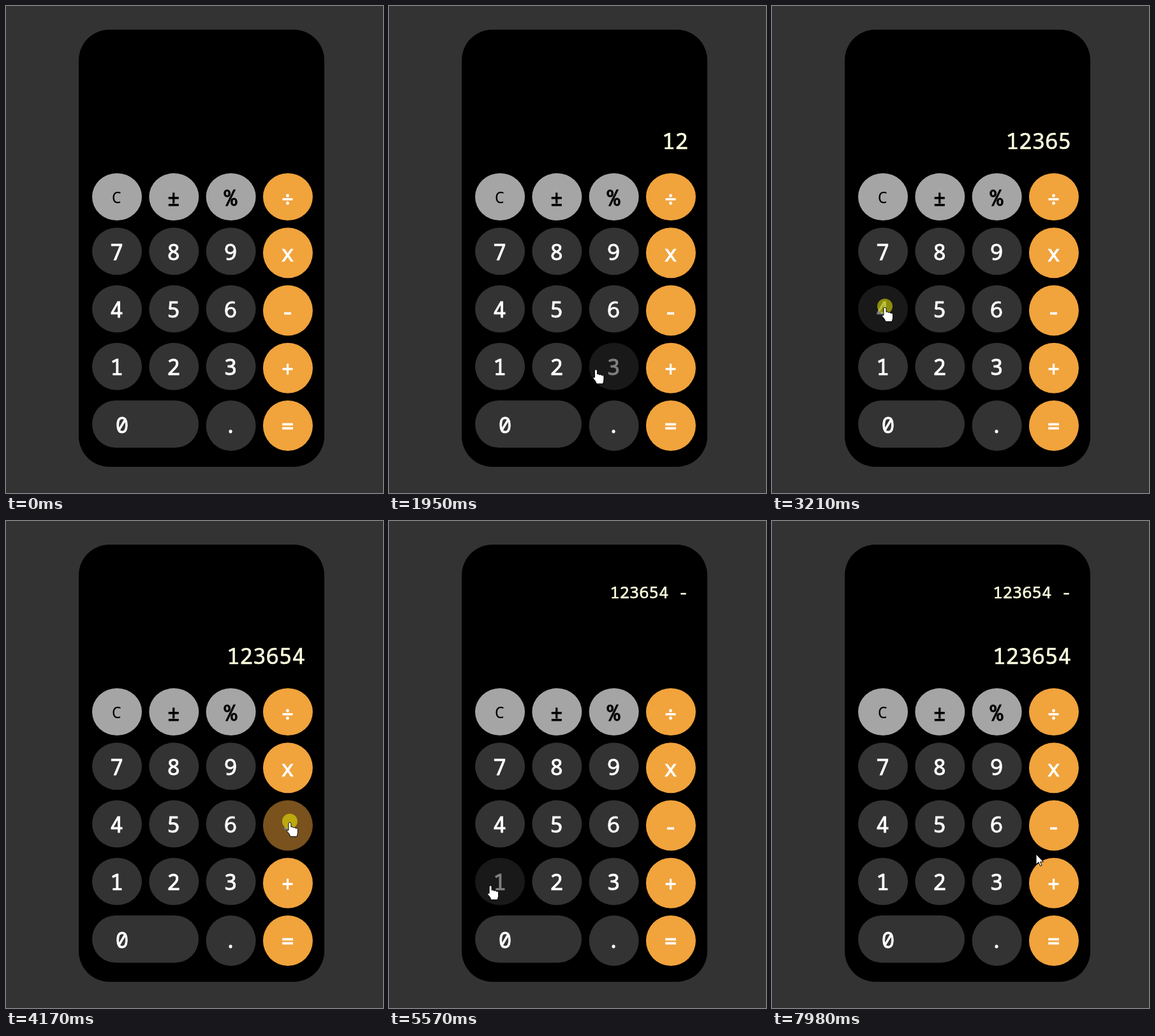
An HTML page that plays this animation: 591x763 px, repeating every 8 s.

```html
<!DOCTYPE html>
<html lang="en">
<head>
<meta charset="utf-8">
<title>Calculator</title>
<style>
  html, body { margin: 0; height: 100%; overflow: hidden; background: #333; }
  svg { display: block; width: 100%; height: 100%; }
  text { font: 34.2px "Noto Sans Mono", "DejaVu Sans Mono", monospace; white-space: pre; }
  .key text { text-anchor: middle; stroke-width: .9; }
  .key .small { font-size: 25.6px; stroke-width: 0; }
  .key.hover { opacity: .5; }
  #upper, #lower { text-anchor: end; fill: lightyellow; stroke: lightyellow; stroke-width: .6; }
  #upper { font-size: 25.6px; }
  #cursor path { fill: #fff; stroke: #000; stroke-linejoin: round; }
</style>
</head>
<body>
<svg viewBox="0 0 591 763">
  <rect x="114" y="37" width="385" height="685" rx="48"/>
  <text id="upper" x="469" y="121"></text>
  <text id="lower" x="469" y="224"></text>
  <g id="keys"></g>
  <g id="cursor">
    <circle id="press" r="12" fill="#ff0" fill-opacity=".5"/>
    <path id="hand" d="M-2 3Q0 0 2 3V9Q4 7 5.500 10Q8 8 9 11Q12 9.500 12.500 13V17Q12.500 20 11 24H1Q0 20-4 16Q-5.500 13-2 14Z"/>
    <path id="arrow" d="M0 0V16L4 12.500L6.500 18.500L9 17.500L6.500 12H11.500Z"/>
  </g>
</svg>
<script>
const $ = id => document.getElementById(id);
const LOOP = 8000, HOLD = 130;
const keys = {};

function add(parent, tag, attrs, text = '') {
  const el = document.createElementNS('http://www.w3.org/2000/svg', tag);
  for (const name in attrs) el.setAttribute(name, attrs[name]);
  el.textContent = text;
  return parent.appendChild(el);
}

function addKey(label, x, y, orange, gray, tall) {
  const zero = label === '0', small = label === 'C';
  const w = zero ? 167 : 78, h = tall ? 79 : 74;
  const ink = gray ? '#000' : '#fff';
  const el = add($('keys'), 'g', { class: 'key' });
  add(el, 'rect', { x, y, width: w, height: h, rx: zero ? h / 2 : w / 2, ry: h / 2,
    fill: orange ? '#f1a33c' : gray ? '#a5a5a5' : '#333' });
  add(el, 'text', { x: x + (zero ? 47 : 38.5), y: y + (small ? 47 : orange ? 53 : 50.5),
    fill: ink, stroke: ink, class: small ? 'small' : '' }, label);
  keys[label] = { el, x, y, w, h };
}

['C±%÷', '789x', '456-', '123+', '0 .='].forEach((row, r) => [...row].forEach((label, c) => {
  if (label === ' ') return;
  const orange = c === 3;
  addKey(label, 135 + 89.3 * c, r ? 257 + 90.25 * r : 262,
    orange, !r && !orange, r && orange || label === '.');
}));

// Keys pressed, with the time each goes down
const downs = [1110, 1600, 2110, 2440, 2790, 3200, 4100, 5650, 5970, 6340, 6960, 7230, 7700];
const presses = [...'123654-123654'].map((label, i) => ({ label, t: downs[i] }));

// Free pointer moves between presses: time, x, y
const moves = [
  [70, 540, 752], [900, 205, 566], [1950, 325, 568], [3840, 446, 469],
  [4520, 390, 410], [4870, 412, 470], [5070, 412, 470], [5280, 314, 488],
  [5570, 158, 570], [6680, 343, 469], [6880, 343, 469], [7930, 414, 522]
];

// The pointer reaches each key just before the press and leaves just after it
const stops = presses.flatMap(({ label, t }) => {
  const x = keys[label].x + 42, y = keys[label].y + 33;
  return [[t - 70, x, y], [t + 150, x, y]];
});
const path = [...moves, ...stops].sort((a, b) => a[0] - b[0]);

function pointerAt(t) {
  const i = path.findIndex(p => p[0] > t);
  if (i < 1) return path.at(i).slice(1);
  const [t0, x0, y0] = path[i - 1], [t1, x1, y1] = path[i];
  const k = (t - t0) / (t1 - t0);
  return [x0 + (x1 - x0) * k, y0 + (y1 - y0) * k];
}

// The picture advances in 70 ms steps, counted anew every 835 ms
function stepped(t) {
  const start = 68 + Math.floor((t - 68) / 835) * 835;
  return start + Math.floor((t - start) / 70) * 70;
}

// Display lines after the given presses: stored operand and current entry
function display(done) {
  let upper = '', lower = '';
  for (const { label } of done) {
    if (label === '-') [upper, lower] = [lower + ' -', ''];
    else lower += label;
  }
  return [upper, lower];
}

const show = (id, on) => $(id).setAttribute('visibility', on ? 'visible' : 'hidden');

function draw(t) {
  const on = t >= 68, [x, y] = pointerAt(t);
  let over = false;
  for (const k of Object.values(keys)) {
    const hit = on && x >= k.x && x < k.x + k.w && y >= k.y && y < k.y + k.h;
    k.el.classList.toggle('hover', hit);
    over ||= hit;
  }
  $('cursor').setAttribute('transform', `translate(${x} ${y})`);
  show('hand', over);
  show('arrow', on && !over);
  show('press', presses.some(p => t >= p.t && t < p.t + HOLD));
  [$('upper').textContent, $('lower').textContent] =
    display(presses.filter(p => t >= p.t + HOLD));
}

function frame() {
  draw(stepped(performance.now() % LOOP));
  requestAnimationFrame(frame);
}
frame();
</script>
</body>
</html>
```
